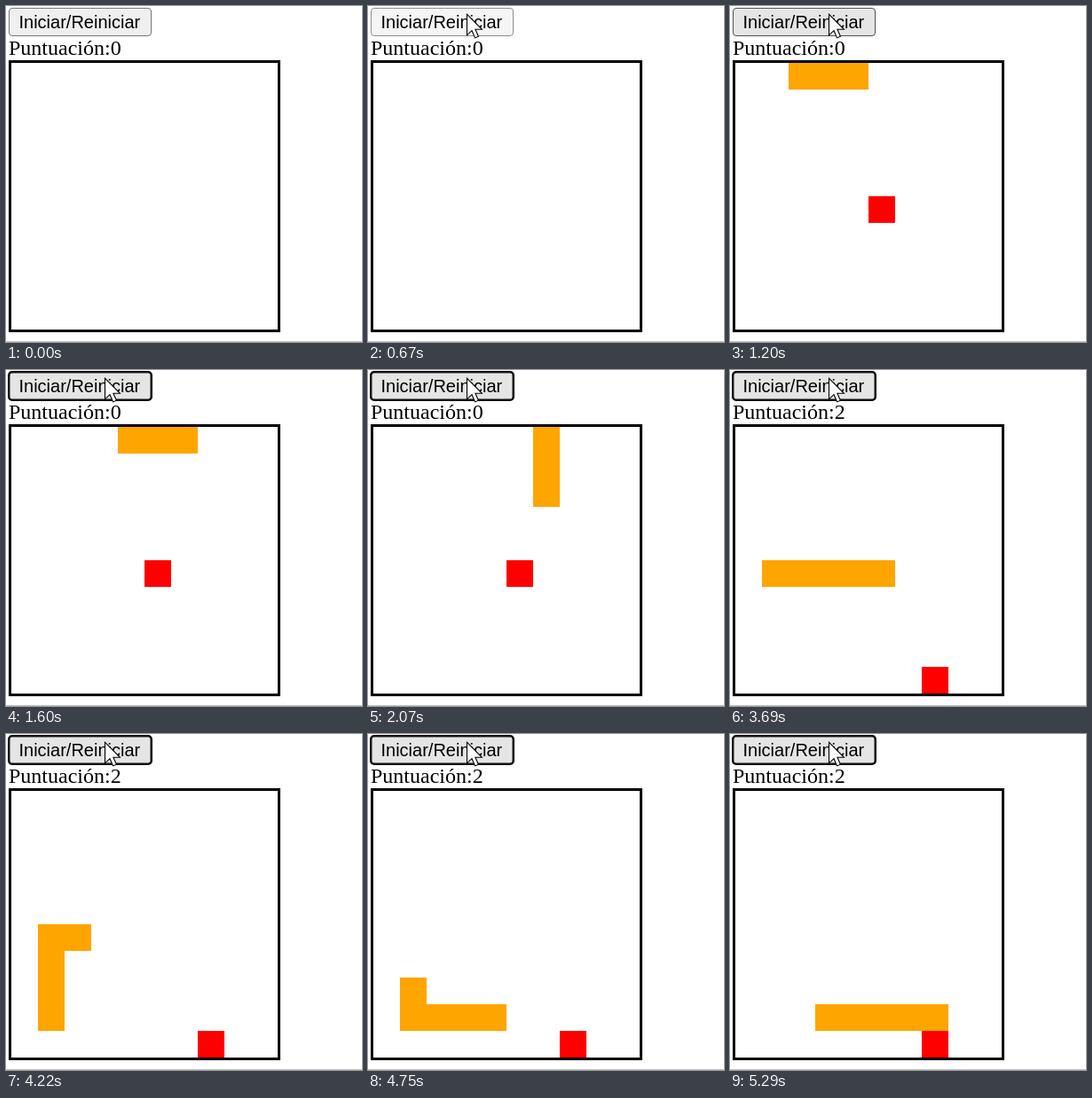
Animation of 401x378 px, one loop 5.36 s. Source, as an HTML page:

```html
<!DOCTYPE html>
<html lang="es">
<head>
<meta charset="utf-8">
<title>Serpiente</title>
<style>
  html, body { margin: 0; width: 100%; height: 100%; overflow: hidden; background: #fff; }
  svg { display: block; width: 401px; height: 378px; }
  .label { font: 20px "Liberation Sans", Arial, sans-serif; }
  .score { font: 24px "Liberation Serif", "Times New Roman", serif; }
  .crisp { shape-rendering: crispEdges; }
  #button { fill: #efefef; stroke: #767676; stroke-width: 1; }
  #button.hover { fill: #e5e5e5; stroke: #4f4f4f; }
  #button.active { fill: #f5f5f5; stroke: #8d8d8d; }
  #ring { fill: none; stroke: #101010; stroke-width: 2.5; }
</style>
</head>
<body>
<svg viewBox="0 0 401 378">
  <rect id="button" x="3.5" y="2.5" width="160" height="31" rx="3.5"/>
  <rect id="ring" x="3.25" y="2.25" width="160.5" height="31.5" rx="3.5"/>
  <text class="label" x="14.5" y="25">Iniciar/Reiniciar</text>
  <text class="score" x="3" y="55">Puntuación:<tspan id="score">0</tspan></text>
  <g class="crisp">
    <rect x="4.5" y="62.5" width="303" height="303" fill="none" stroke="#000" stroke-width="3"/>
    <rect y="377" width="401" height="1" fill="#c0c0c0"/>
    <path id="snake" fill="#ffa500"/>
    <path id="apple" fill="#f00"/>
  </g>
  <path id="cursor" d="M.5 .8V24.3L6 19.2L9.6 27.4L13.4 25.8L9.9 17.8H17.4Z"
        fill="#fff" stroke="#000" stroke-width="1.1"/>
</svg>
<script>
  const LOOP = 5360, PRESS = 670, START = 740, FOCUS = 1530;
  const $ = id => document.getElementById(id);

  const moveTimes = [70, 130, 200, 270, 330, 400, 530];
  const ticks = [740, 930, 1200, 1400, 1600, 1800, 2070, 2270, 2540, 2740, 2940, 3160,
    3360, 3560, 3690, 3890, 4090, 4220, 4420, 4620, 4750, 4950, 5150, 5290];
  const apples = [[5, 5], [3, 5], [7, 9]];
  const steps = { R: [1, 0], D: [0, 1], L: [-1, 0] };

  // Every cell the head visits, in order
  const trail = [[0, 0]];
  for (const s of "RRRRRRDDDDDLLLLLDDDRRRRRR") {
    const [x, y] = trail[trail.length - 1];
    trail.push([x + steps[s][0], y + steps[s][1]]);
  }

  const lastIndex = (times, t) => times.filter(v => v <= t).length - 1;
  const cell = ([x, y]) => `M${6 + 30 * x} ${64 + 30 * y}h30v30h-30z`;
  const bezier = (a, b, c, u) => a * (1 - u) ** 2 + 2 * b * u * (1 - u) + c * u * u;

  function drawCursor(t) {
    const i = lastIndex(moveTimes, t);
    const u = 1 - (1 - Math.max(i, 0) / 6) ** 1.4;
    const x = bezier(311, 200, 111, u), y = bezier(285, 85, 8.5, u);
    $("cursor").setAttribute("visibility", i < 0 ? "hidden" : "visible");
    $("cursor").setAttribute("transform", `translate(${x} ${y})`);
    const over = i >= 0 && x < 164 && y < 34;
    const pressed = t >= PRESS && t < START;
    $("button").setAttribute("class", pressed ? "active" : over ? "hover" : "");
    $("ring").setAttribute("visibility", t >= FOCUS ? "visible" : "hidden");
  }

  function drawGame(t) {
    const k = lastIndex(ticks, t);
    const score = k >= 12 ? 2 : k >= 10 ? 1 : 0;
    const body = k < 0 ? [] : trail.slice(k - score, k + 3);
    $("snake").setAttribute("d", body.map(cell).join(""));
    $("apple").setAttribute("d", k < 0 ? "" : cell(apples[score]));
    $("score").textContent = score;
  }

  const origin = performance.now();
  function frame() {
    const t = (performance.now() - origin) % LOOP;
    drawCursor(t);
    drawGame(t);
    requestAnimationFrame(frame);
  }
  frame();
</script>
</body>
</html>
```
